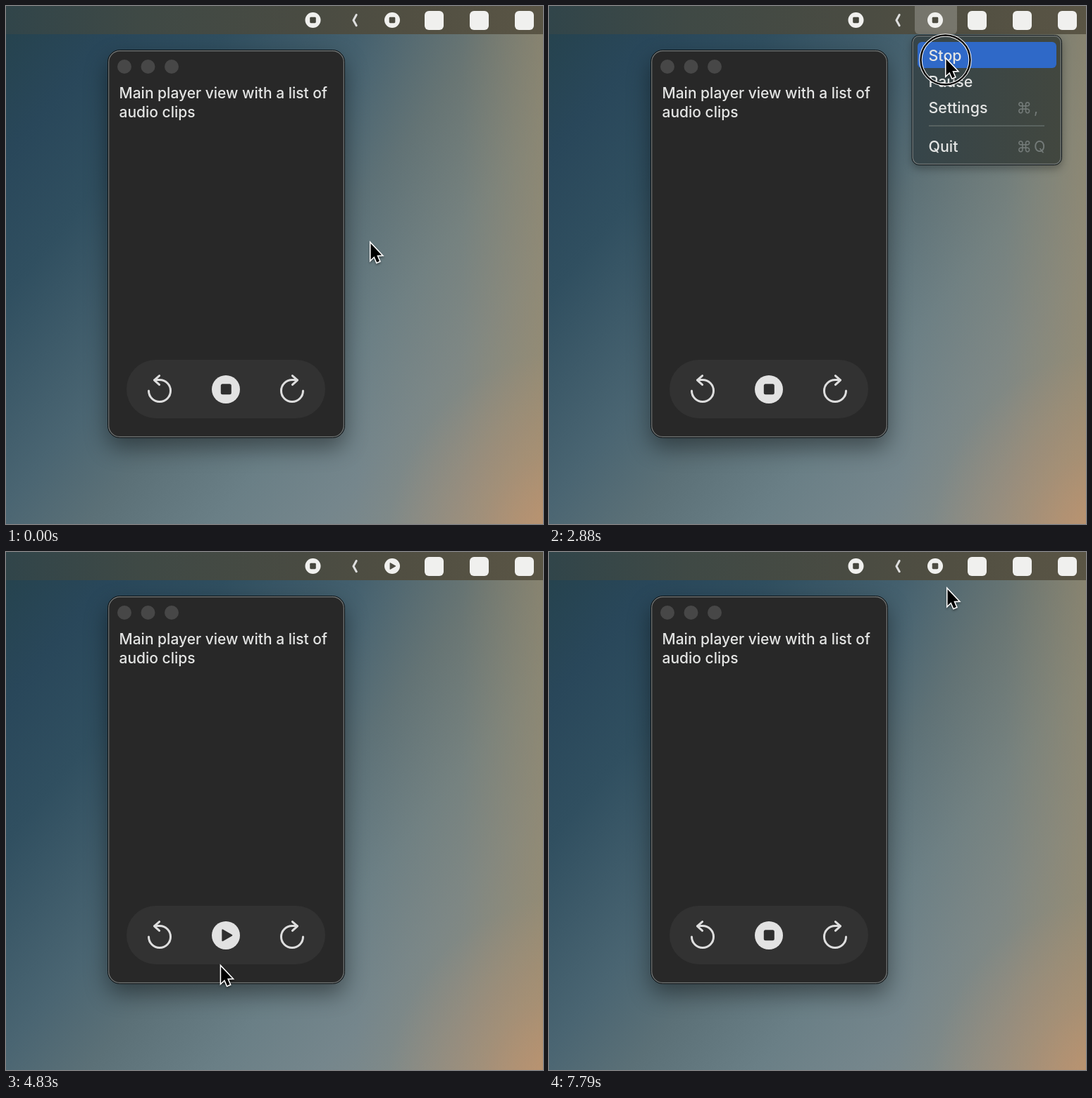
These frames come from a looping animation (762 by 735 pixels, 8 s). An HTML page:

```html
<!DOCTYPE html>
<html lang="en">
<head>
<meta charset="utf-8">
<title>Audio player menu</title>
<style>
  html, body { margin: 0; width: 100%; height: 100%; overflow: hidden; }
  #stage {
    position: relative; width: 762px; height: 735px; overflow: hidden;
    background:
      linear-gradient(90deg, #31454a, #3f4945 25%, #494b42 55%, #514f42 75%, #5a5545) 0 0 / 100% 40px no-repeat,
      radial-gradient(260px 280px at 800px 770px, rgba(205,150,110,.8), rgba(205,150,110,.3) 50%, rgba(205,150,110,0)),
      linear-gradient(90deg, rgba(160,140,104,0) 65%, rgba(160,140,104,.22) 85%, rgba(160,140,104,.62)),
      linear-gradient(130deg, #25424c, #29475a 13%, #304f60 25%, #4a6572 43%, #5b7077 53%, #6a7f86 66%, #75868c 77%, #8e9088);
  }
  svg { position: absolute; inset: 0; }
  text { font: 500 21px Inter, "DejaVu Sans", sans-serif; fill: #e4e5e4; }
  #menu text { font-size: 21.4px; }
  #menu .key { font-weight: 400; fill: #747b79; }
  .panel { filter: drop-shadow(0 14px 16px rgba(0,0,0,.42)); }
  .popup { filter: drop-shadow(0 5px 6px rgba(0,0,0,.3)); }
  .edge { fill: none; stroke: #747979; stroke-width: 1.2; }
  .line { fill: none; stroke: #dedede; stroke-width: 3; stroke-linecap: round; stroke-linejoin: round; }
  .pointer { filter: drop-shadow(0 2px 2px rgba(0,0,0,.4)); }
</style>
</head>
<body>
<div id="stage">
<svg width="762" height="735" viewBox="0 0 762 735">
  <defs>
    <linearGradient id="menuFill">
      <stop stop-color="#36454a"/>
      <stop offset="1" stop-color="#42473f"/>
    </linearGradient>
    <rect id="stopMark" x="-7.5" y="-7.5" width="15" height="15" rx="2.5"/>
    <path id="playMark" d="M-5-7.5 8 0-5 7.5Z" stroke-width="2" stroke-linejoin="round"/>
    <g id="turn">
      <path class="line" d="M202.5 546a15.5 15.5 0 1 0 15.5-15.5h-7"/>
      <path class="line" d="M217.6 524.6l-7.2 6.2 7.2 6.5"/>
    </g>
  </defs>

  <!-- menu bar -->
  <rect id="barHighlight" x="519" y="-8" width="60" height="48" rx="6" fill="#fff" fill-opacity=".22"/>
  <g fill="#f0f0ee">
    <circle cx="435.5" cy="20" r="11"/>
    <circle cx="548" cy="20" r="11"/>
    <rect x="594" y="7" width="27" height="27" rx="6"/>
    <rect x="658" y="7" width="27" height="27" rx="6"/>
    <rect x="722" y="7" width="27" height="27" rx="6"/>
  </g>
  <path class="line" d="M497.2 12.6l-4.2 7.6 4.2 7.6"/>
  <use href="#stopMark" transform="translate(435.5 20) scale(.57)" fill="#45463d"/>
  <g transform="translate(548 20) scale(.57)" fill="#4d4c42" stroke="#4d4c42" stroke-width="0">
    <use class="stopState" href="#stopMark"/>
    <use class="playState" href="#playMark"/>
  </g>

  <!-- player window -->
  <rect class="panel" x="144.5" y="62.5" width="336" height="550" rx="17" fill="#282828" stroke="#0c1114"/>
  <rect class="edge" x="145.7" y="63.7" width="333.6" height="547.6" rx="16"/>
  <g fill="#474747">
    <circle cx="168" cy="86" r="10"/>
    <circle cx="201.5" cy="86" r="10"/>
    <circle cx="235" cy="86" r="10"/>
  </g>
  <text x="160.5" y="131">Main player view with a list of</text>
  <text x="160.5" y="158">audio clips</text>
  <rect x="171" y="502" width="282" height="83" rx="41.5" fill="#323232"/>
  <use href="#turn"/>
  <use href="#turn" transform="translate(624 0) scale(-1 1)"/>
  <circle cx="312" cy="544" r="20" fill="#e2e2e2"/>
  <g transform="translate(312.3 543.8)" fill="#2f2f2f" stroke="#2f2f2f" stroke-width="0">
    <use class="stopState" href="#stopMark"/>
    <use class="playState" href="#playMark"/>
  </g>

  <g id="menu"></g>

  <g id="ring" fill="none">
    <circle r="35" stroke="#f4f4f4" stroke-width="4.5"/>
    <circle r="35" stroke="#000" stroke-width="2.4"/>
  </g>
  <g id="pointer">
    <path class="pointer" transform="scale(.92)" d="M0 0V25L5.5 19.8 9.5 29 13.5 27.3 9.6 18.3 17 18Z"
          stroke="#fff" stroke-width="3.4" paint-order="stroke"/>
  </g>
</svg>
</div>
<script>
  const LOOP = 8000;
  const $ = id => document.getElementById(id);
  const show = (el, on) => { el.style.display = on ? '' : 'none'; };

  // time, x, y of the pointer tip; equal neighbours are rests
  const path = [
    [0, 517.5, 337], [750, 517.5, 337], [1540, 541, 34], [1580, 541, 34], [1720, 553.5, 21],
    [2290, 553.5, 21], [2540, 563.5, 75.5], [3580, 563.5, 75.5], [4380, 296, 575],
    [4420, 296, 575], [4600, 268, 598], [4830, 304.5, 588], [5130, 374, 634],
    [5420, 374, 634], [6210, 556, 16], [6790, 556, 16], [7130, 565.5, 53], [LOOP, 565.5, 53]
  ];

  const clicks = [1700, 2710, 6250, 7290];
  const CLICK_LENGTH = 205;

  // shown from open, fading between close and gone, bar item lit until done
  const menus = [
    { open: 1860, hover: 2380, close: 2920, gone: 3090, done: 3250, items: ['Stop', 'Pause', 'Settings'] },
    { open: 6460, hover: 6910, close: 7500, gone: 7650, done: 7750, items: ['Play', 'Settings'] }
  ];

  function menuMarkup({ items }) {
    const end = 77.5 + 37 * (items.length - 1);
    const height = end + 73.5 - 42;
    const labels = items.map((label, i) =>
      `<text x="538.5" y="${77.5 + 37 * i}">${label}</text>`).join('');
    const keys = (sign, y) =>
      `<text class="key" x="663.5" y="${y}">⌘</text><text class="key" x="688" y="${y}">${sign}</text>`;
    return `
      <rect class="popup" x="515" y="41.5" width="212.5" height="${height + 1}" rx="10" fill="url(#menuFill)" stroke="#10171a"/>
      <rect class="edge" x="516.2" y="42.7" width="210" height="${height - 1.4}" rx="9"/>
      <rect class="hover" x="523" y="51" width="197" height="37" rx="6" fill="#2f69c8"/>
      ${labels}${keys(',', end)}
      <path d="M539 ${end + 18.5}H703" stroke="#626b69" stroke-width="1.6"/>
      <text x="538.5" y="${end + 55}">Quit</text>${keys('Q', end + 55)}`;
  }

  for (const menu of menus) {
    menu.el = document.createElementNS('http://www.w3.org/2000/svg', 'g');
    menu.el.innerHTML = menuMarkup(menu);
    menu.hoverEl = menu.el.querySelector('.hover');
    $('menu').append(menu.el);
  }

  function pointerAt(t) {
    const i = path.findIndex(p => p[0] > t);
    const [t0, x0, y0] = path[i - 1], [t1, x1, y1] = path[i];
    const k = 1 - (1 - (t - t0) / (t1 - t0)) ** 3;
    return [x0 + (x1 - x0) * k, y0 + (y1 - y0) * k];
  }

  function draw(t) {
    const [x, y] = pointerAt(t);
    $('pointer').setAttribute('transform', `translate(${x} ${y})`);
    $('ring').setAttribute('transform', `translate(${x - 1} ${y + 1})`);
    show($('ring'), clicks.some(c => t >= c && t < c + CLICK_LENGTH));

    for (const m of menus) {
      show(m.el, t >= m.open && t < m.gone);
      m.el.style.opacity = Math.min(1, (m.gone - t) / (m.gone - m.close));
      show(m.hoverEl, t >= m.hover);
    }
    show($('barHighlight'), menus.some(m => t >= m.open && t < m.done));

    const stopped = t >= menus[0].done && t < menus[1].done;
    document.querySelectorAll('.playState').forEach(el => show(el, stopped));
    document.querySelectorAll('.stopState').forEach(el => show(el, !stopped));
  }

  const start = performance.now();
  function tick() {
    draw((performance.now() - start) % LOOP);
    requestAnimationFrame(tick);
  }
  tick();
</script>
</body>
</html>
```
